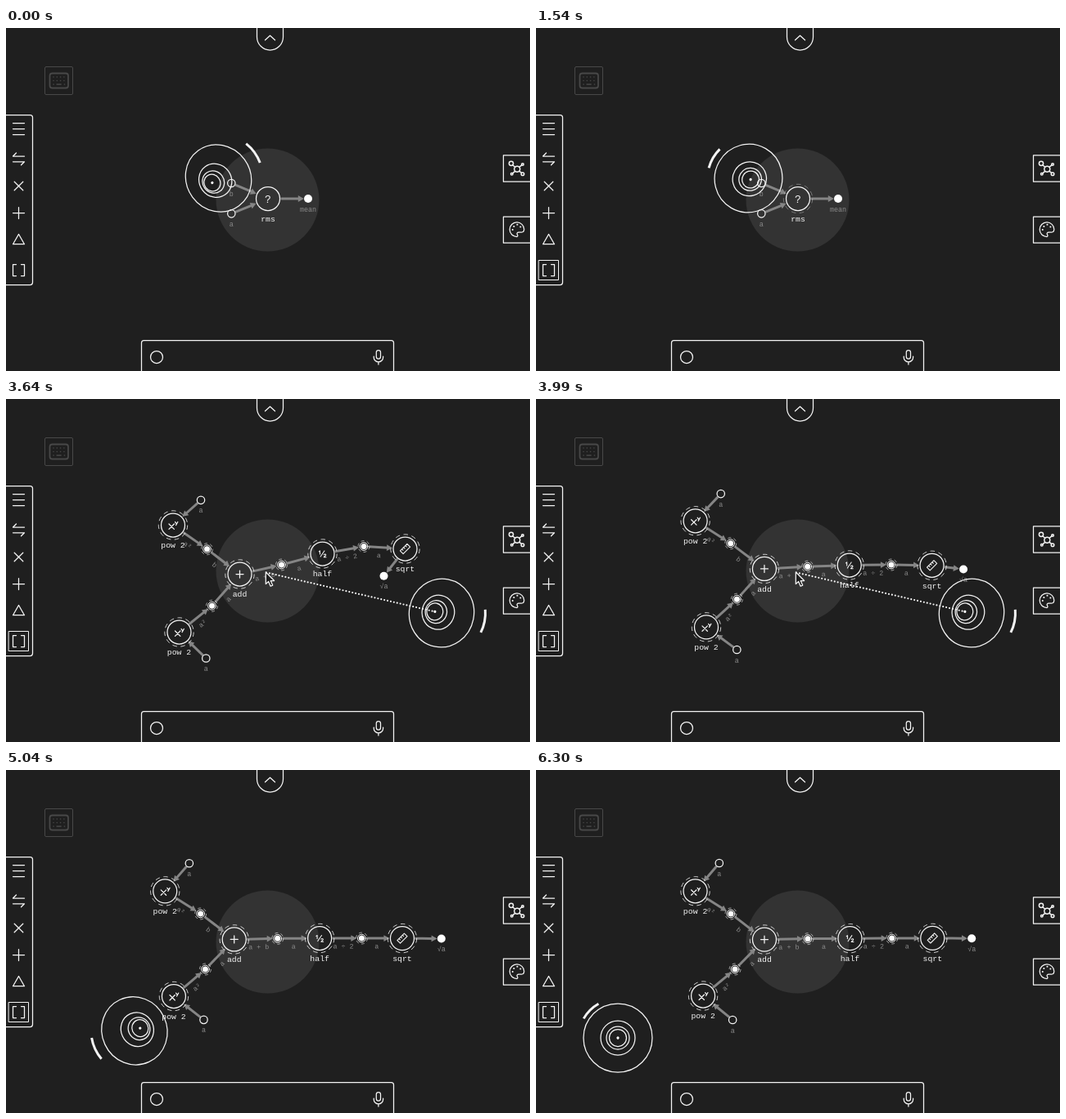
An HTML page that plays this animation: 640 px wide and 420 px high, repeating every 6370 ms.

```html
<!DOCTYPE html>
<html lang="en">
<head>
<meta charset="utf-8">
<title>Graph editor</title>
<style>
html, body { margin: 0; width: 100%; height: 100%; overflow: hidden; background: #1f1f1f; }
svg { display: block; width: 100vw; height: 100vh; }
text { font-family: "Liberation Mono", "Noto Sans Mono", monospace; text-anchor: middle; stroke: none; }
.title { font-size: 9.8px; fill: #f4f4f4; }
.pin { font-size: 8.4px; fill: #8a8a8a; }
.line { fill: none; stroke: #f4f4f4; stroke-width: 1.25; stroke-linecap: round; stroke-linejoin: round; }
.dim { stroke: #484848; }
.edge { stroke: #858585; stroke-width: 3; }
.head { fill: #858585; }
.solid { fill: #fff; stroke: none; }
</style>
</head>
<body>
<svg viewBox="0 0 640 420">
  <rect width="640" height="420" fill="#1f1f1f"/>
  <circle cx="319.5" cy="210.5" r="63" fill="#333"/>
  <g class="line dim">
    <rect x="47.5" y="47.5" width="34" height="34" rx="1.5" stroke-width="1"/>
    <rect x="53.5" y="55.5" width="22.5" height="18" rx="3" stroke-width="1.8"/>
    <path stroke-width="1.6" stroke-dasharray="0 4.3" d="M58 60h13.5M58 64.5h13.5"/>
    <path stroke-width="1.6" d="M58 69h.1m4 0h5m4.3 0h.1"/>
  </g>
  <g class="line">
    <path d="M306.5 -2V11a16 16 0 0 0 32 0V-2M316.5 14.8l6-5.6 6 5.6"/>
    <rect x="-6" y="106.5" width="38.5" height="208" rx="3"/>
    <path d="M8.5 116.5h14m-14 7h14m-14 7h14"/>
    <path d="M22.5 157h-14l4-4M8.5 163.8h14l-4 4"/>
    <path d="M10.2 188.2l10.6 10.6m0-10.6l-10.6 10.6"/>
    <path d="M8.5 226.6h14m-7-7v14"/>
    <path d="M15.5 252.5l7 12.2h-14z"/>
    <path d="M12.5 289.5h-4v14h4M18.5 289.5h4v14h-4"/>
    <rect x="607.5" y="155.8" width="40" height="32.4"/>
    <rect x="607.5" y="231" width="40" height="32.2"/>
    <g stroke-width="1.5">
      <circle cx="624.3" cy="172.8" r="3.5"/>
      <circle cx="617" cy="165.8" r="2.6"/>
      <circle cx="631" cy="167" r="1.3"/>
      <circle cx="631" cy="178.7" r="1.8"/>
      <circle cx="617.8" cy="178.8" r="1.3"/>
      <path d="M619 168l2.7 2.3m5.2 0l3-2.4m-2.9 7.5l2.7 2m-7.9-2l-3 2.4"/>
    </g>
    <path d="M624 255.5a8.8 8.8 0 1 1 8.8-9c0 3-2 3.8-4 3.6h-2.5c-2 0-2.6 1.5-1.8 2.8.7 1.4.5 2.6-.5 2.6z"/>
    <path stroke-width="2" d="M618.7 247h.1m1.5-4h.1m4-2.2h.1m3.8 2.7h.1"/>
    <rect x="165.5" y="382.5" width="308" height="50" rx="3"/>
    <circle cx="184" cy="403" r="7.5"/>
    <rect x="452.3" y="394.5" width="5.2" height="10.5" rx="2.6"/>
    <path d="M449.2 402v1.2a5.7 5.7 0 0 0 11.4 0V402M454.9 409v3"/>
    <rect id="pick" x="3.5" y="284.5" width="24" height="24" stroke-width="1"/>
  </g>
  <g id="graph"></g>
  <g id="link"></g>
  <g id="pointer"></g>
</svg>
<script>
const LOOP = 6370, STEP = 70;
const el = id => document.getElementById(id);
const clamp = x => Math.max(0, Math.min(1, x));
const mix = (a, b, k) => a + (b - a) * k;
const mixPoint = (p, q, k) => [mix(p[0], q[0], k), mix(p[1], q[1], k)];
const settle = (t, start, tau) => t < start ? 0 : 1 - Math.exp((start - t) / tau);

// Smooth interpolation through [time, value] pairs.
function track(keys, t) {
  if (t <= keys[0][0]) return keys[0][1];
  for (let i = 1; i < keys.length; i++) {
    const [t0, a] = keys[i - 1], [t1, b] = keys[i];
    if (t <= t1) {
      const k = (t - t0) / (t1 - t0);
      return mix(a, b, k * k * (3 - 2 * k));
    }
  }
  return keys[keys.length - 1][1];
}

const ring = (r, cls = "line", extra = "") => `<circle r="${r}" class="${cls}" ${extra}/>`;
const dashes = (r, n, alpha) => {
  const unit = 2 * Math.PI * r / n;
  return ring(r, "line", `style="stroke-width:1;stroke-linecap:butt" opacity="${alpha}" stroke-dasharray="${unit * 0.55} ${unit * 0.45}"`);
};
const label = (cls, y, text) => `<text class="${cls}" y="${y}">${text}</text>`;
const at = ([x, y], body) => `<g transform="translate(${x.toFixed(2)} ${y.toFixed(2)})">${body}</g>`;

const icons = {
  ask: '<text y="4.5" style="font-size:13px" fill="#f4f4f4">?</text>',
  pow: '<path class="line" d="M-5 -1.5l6.4 6.4m0-6.4l-6.4 6.4M2.6 -4l1.5 2m1.7-2l-2.2 4"/>',
  add: '<path class="line" d="M-4.5 0h9m-4.5-4.5v9"/>',
  half: '<path class="line" transform="scale(.85)" d="M-2.8 4.2l5.6-8.4M-5 -3l1.4-1.2v4.7M2 1.5c1-1.5 3.5-.8 2.8.8L2 5h3.3"/>',
  root: '<path class="line" style="stroke-width:1.1" transform="rotate(-45)" d="M-6 -2.6h12v5.2h-12zM-3 -2.6v2m3-2v2m3-2v2"/>'
};

const shapes = {
  unit: (n, alpha) => ring(14.5) + dashes(17.7, 11, alpha) + icons[n.icon] + label("title", 27.8, n.text),
  input: n => ring(4.7) + label("pin", 15.6, n.text),
  output: n => ring(5, "solid") + label("pin", 15.6, n.text),
  joint: () => ring(4.9, "line", 'style="stroke-width:1"') + ring(3.5, "solid") + dashes(7, 6, 0.6)
};
const radius = { unit: 15.5, input: 5.2, output: 5.2, joint: 6 };

function edge(p, q, from, to, text) {
  const dx = q[0] - p[0], dy = q[1] - p[1], len = Math.hypot(dx, dy);
  const a = radius[from], b = len - radius[to];
  if (b - a < 2) return "";
  const turn = Math.atan2(dy, dx) * 180 / Math.PI;
  const name = text ? `<text class="pin" x="${(a + b) / 2 - 1.5}" y="12.5">${text}</text>` : "";
  return at(p, `<g transform="rotate(${turn.toFixed(2)})">
    <path class="edge" d="M${a} 0H${Math.max(a, b - 5)}"/>
    <path class="head" d="M${b} 0l-7 -3.9v7.8z"/>${name}</g>`);
}

const simple = {
  nodes: [
    { kind: "input", text: "b", pos: [275.3, 190] },
    { kind: "input", text: "a", pos: [275.3, 227.3] },
    { kind: "unit", icon: "ask", text: "rms", pos: [320, 209] },
    { kind: "output", text: "mean", pos: [369, 209] }
  ],
  edges: [[0, 2], [1, 2], [2, 3]]
};

// Each node passes through three poses: burst, spread, rest.
const full = {
  nodes: [
    { kind: "input", text: "a", path: [[238, 123.8], [224, 115], [223.8, 114]] },
    { kind: "unit", icon: "pow", text: "pow 2", path: [[204, 154.5], [193.3, 148.5], [194.6, 148.3]] },
    { kind: "joint", path: [[245.5, 183.7], [236.6, 175.7], [238, 176]] },
    { kind: "unit", icon: "add", text: "add", path: [[285.5, 214.5], [278, 207], [279, 207.6]] },
    { kind: "joint", path: [[251.5, 253.3], [244.5, 244], [243, 244]] },
    { kind: "unit", icon: "pow", text: "pow 2", path: [[211.5, 285.5], [207.5, 278.5], [204, 276.5]] },
    { kind: "input", text: "a", path: [[244.3, 317.5], [245.5, 305.5], [240, 306]] },
    { kind: "joint", path: [[336.5, 203], [331, 205.5], [332, 206.7]] },
    { kind: "unit", icon: "half", text: "half", path: [[386.5, 189.5], [382.2, 205.5], [383.5, 206.2]] },
    { kind: "joint", path: [[437, 180.5], [433.5, 206.2], [434.7, 206]] },
    { kind: "unit", icon: "root", text: "sqrt", path: [[487.5, 183.5], [483, 206.7], [484.3, 205.9]] },
    { kind: "output", text: "√a", path: [[461.5, 216.8], [530.7, 207.3], [532.2, 206.2]] }
  ],
  edges: [
    [0, 1], [1, 2, "a²"], [2, 3, "b"], [6, 5], [5, 4, "a²"], [4, 3, "a"],
    [3, 7, "a + b"], [7, 8, "a"], [8, 9, "a ÷ 2"], [9, 10, "a"], [10, 11]
  ]
};

const BURST = 3430, OPEN = 3640, SPREAD = 4340;
const easeOut = k => 1 - (1 - k) ** 3;

function place(path, t) {
  const [burst, spread, rest] = path;
  if (t < OPEN) return mixPoint(mixPoint([320, 209], burst, 0.35), burst, easeOut(clamp((t - BURST + STEP) / (OPEN - BURST + STEP))));
  if (t < SPREAD) return mixPoint(burst, spread, easeOut((t - OPEN) / (SPREAD - OPEN)));
  return mixPoint(spread, rest, settle(t, SPREAD, 540));
}

function drawGraph(t) {
  const { nodes, edges } = t < BURST ? simple : full;
  const spots = nodes.map(n => n.pos || place(n.path, t));
  const alpha = track([[980, 0], [1540, 0.35], [2170, 0.8]], t);
  return edges.map(([i, j, text]) => edge(spots[i], spots[j], nodes[i].kind, nodes[j].kind, text)).join("")
    + nodes.map((n, i) => at(spots[i], shapes[n.kind](n, alpha))).join("");
}

// Direction of the outer arc in degrees; the inner rings lean the other way.
const heading = [[0, -36], [280, -19], [420, -19], [770, -27], [980, -27], [1400, -125], [1540, -150],
  [2240, -148], [2420, 10], [2940, 11], [4690, 11], [4900, 138], [5040, 155], [5250, 162], [5900, 225]];
const lean = [[0, 9.4], [980, 9.4], [1260, 8], [1540, 3], [1820, 0], [2240, 0], [2400, 8.3],
  [4690, 8.3], [5040, 7.6], [5500, 7], [5950, 0]];
const LEFT = [259.5, 184], RIGHT = [532, 262], CORNER = [100, 328];

function pointerState(t) {
  const pos = t > 4740
    ? mixPoint(RIGHT, CORNER, settle(t, 4740, 148))
    : mixPoint(LEFT, RIGHT, settle(t, 2240, 50));
  const turn = track(heading, t), d = track(lean, t), a = turn * Math.PI / 180;
  return { pos, turn, d, tip: [pos[0] - d * Math.cos(a), pos[1] - d * Math.sin(a)] };
}

function drawPointer({ pos, turn, d }) {
  const rings = [[42, 0], [21, 0.5], [14, 0.82], [10.5, 1]].map(([r, k]) =>
    `<ellipse class="line" cx="${-d * k}" rx="${r * (1 - 0.007 * d)}" ry="${r}"/>`).join("");
  const r = 48 + 0.66 * d, half = 15.5 * Math.PI / 180;
  const x = r * Math.cos(half), y = r * Math.sin(half);
  return at(pos, `<g transform="rotate(${turn})">${rings}
    <circle class="solid" cx="${-d}" r="1.6"/>
    <path class="line" style="stroke-width:3;stroke-linecap:butt" d="M${x} ${-y}A${r} ${r} 0 0 1 ${x} ${y}"/></g>`);
}

function drawLink(t, tip) {
  let out = "";
  if (t >= 3080 && t < 4060)
    out += `<path class="line" style="stroke-width:2.2" stroke-dasharray="0 4" d="M318 212.5L${tip[0]} ${tip[1]}"/>`;
  if (t >= 3080 && t < 4760)
    out += '<path class="line" style="fill:#1f1f1f" d="M317.3 212v14.5l3.3-3 2.5 5.8 2.6-1.2-2.5-5.6h4.4z"/>';
  return out;
}

function draw(t) {
  const p = pointerState(t);
  el("pick").setAttribute("opacity", clamp((t - 350) / 210));
  el("graph").innerHTML = drawGraph(t);
  el("link").innerHTML = drawLink(t, p.tip);
  el("pointer").innerHTML = drawPointer(p);
}

const start = performance.now();
let shown = -1;
function tick() {
  const t = Math.floor(((performance.now() - start) % LOOP) / STEP) * STEP;
  if (t !== shown) draw(shown = t);
  requestAnimationFrame(tick);
}
tick();
</script>
</body>
</html>
```
